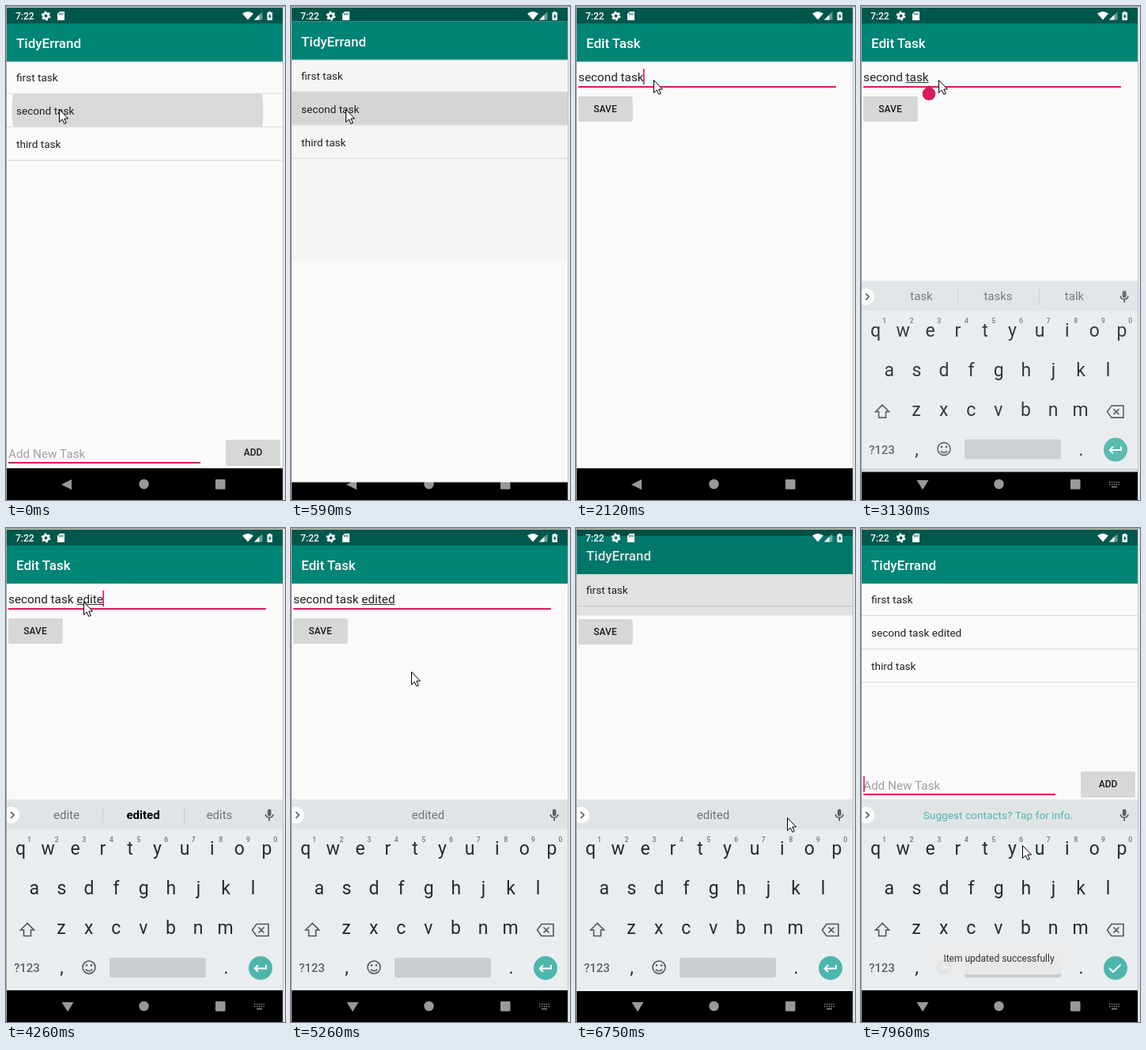
These frames come from a looping animation (353x623 px, 8 s). An HTML page:

```html
<!DOCTYPE html>
<html lang="en">
<head>
<meta charset="utf-8">
<title>Task list demo</title>
<style>
  html, body { margin: 0; width: 100%; height: 100%; overflow: hidden; background: #e6e6e6; }
  svg { display: block; width: 353px; height: 623px; font-family: Roboto, sans-serif; }
  text { white-space: pre; }
  .title { font-size: 17px; font-weight: 500; fill: #fff; }
  .row { font-size: 13.6px; fill: #212121; }
  .field { font-size: 15.3px; fill: #212121; }
  .btn { font-size: 12px; font-weight: 500; fill: #1c1c1c; text-anchor: middle; }
  .key { font-size: 23px; fill: #1f2d33; text-anchor: middle; }
  .hint { font-size: 9px; font-weight: 500; fill: #6f7a80; text-anchor: middle; }
  .sug { font-size: 15px; fill: #6b767c; text-anchor: middle; }
  .sug.strong { fill: #000; font-weight: 700; }
  .sug.tip { fill: #4db6ac; font-size: 13.7px; }
  .line { fill: none; stroke: #4b585e; stroke-width: 1.6; }
</style>
</head>
<body>
<svg viewBox="0 0 353 623">
  <defs>
    <clipPath id="rowClip"><rect x="1" y="111" width="349" height="41"/></clipPath>
    <clipPath id="editClip"><rect id="editBox" x="1" width="349" height="623"/></clipPath>
    <clipPath id="kbClip"><rect x="1" y="343" width="349" height="240"/></clipPath>
  </defs>

  <g id="list">
    <rect x="1" width="349" height="640" fill="#fafafa"/>
    <rect x="1" y="2" width="349" height="20" fill="#00574b"/>
    <rect x="1" y="22" width="349" height="48" fill="#008577"/>
    <rect x="1" y="70" width="349" height="1" fill="#000" opacity=".13"/>
    <text class="title" x="13" y="53">TidyErrand</text>
    <g clip-path="url(#rowClip)"><circle id="ripple" cx="166.5" cy="132" fill="#d9d9d9"/></g>
    <path d="M1 110.500H350M1 152.500H350M1 194.500H350" stroke="#dcdcdc"/>
    <text class="row" x="13" y="95">first task</text>
    <text class="row" x="13" y="137" id="second"></text>
    <text class="row" x="13" y="179">third task</text>
    <g id="adder">
      <text class="field" x="3" y="569.500" style="fill:#a0a0a0">Add New Task</text>
      <rect x="3" y="575" width="243" height="2" fill="#d81b60"/>
      <rect id="addCaret" x="3" y="553" width="1.600" height="20" fill="#d81b60"/>
      <rect x="278" y="548" width="69" height="32" rx="2" fill="#000" opacity=".15"/>
      <rect x="278" y="547" width="69" height="31.500" rx="2" fill="#d6d7d7"/>
      <text class="btn" x="312.500" y="567">ADD</text>
    </g>
    <rect id="dim" x="1" width="349" height="640" fill="#000"/>
  </g>

  <rect x="1" y="583" width="349" height="40" fill="#000"/>
  <g fill="#999">
    <path id="back" d="M70 603.500L83 597V610Z"/>
    <path id="down" d="M70.500 598H85.500L78 610Z"/>
    <circle cx="174.500" cy="603" r="6.200"/>
    <rect x="265" y="597" width="12.500" height="12.500" rx="1"/>
    <g id="kbIcon" fill="none" stroke="#888" stroke-width="1.500">
      <path d="M314 600.500H327M314 603.500H327" stroke-dasharray="1.500 1.400"/>
      <path d="M317 606.500H324"/>
    </g>
  </g>

  <g clip-path="url(#editClip)" id="editWrap">
    <rect id="editStatus" x="1" y="2" width="349" height="20" fill="#00574b"/>
    <g id="edit">
      <rect x="1" y="22" width="349" height="561" fill="#fafafa"/>
      <rect x="1" y="22" width="349" height="48" fill="#008577"/>
      <rect x="1" y="70" width="349" height="1" fill="#000" opacity=".13"/>
      <text class="title" x="13" y="53">Edit Task</text>
      <text class="field" x="3" y="95" id="entry"></text>
      <rect id="mark" y="96" height="1" fill="#333"/>
      <rect id="rule" x="3" y="101" width="326" height="2"/>
      <rect id="caret" y="79" width="1.600" height="20" fill="#d81b60"/>
      <path id="handle" d="M86 100L92 105A8.300 8.300 0 1 1 80 105Z" fill="#d81b60"/>
      <rect x="3" y="114.500" width="68.500" height="31.500" rx="2" fill="#000" opacity=".15"/>
      <rect id="save" x="3" y="114" width="68.500" height="31" rx="2"/>
      <text class="btn" x="37" y="133.700">SAVE</text>
    </g>
  </g>

  <g id="kb">
    <rect x="1" y="343" width="349" height="240" fill="#e9edf0"/>
    <rect x="1" y="343" width="349" height="37" fill="#e0e4e7"/>
    <rect x="1" y="342" width="349" height="1" fill="#000" opacity=".07"/>
    <circle cx="6.500" cy="362" r="10.500" fill="#fff" clip-path="url(#kbClip)"/>
    <path class="line" d="M6 358L10 362L6 366" stroke-width="2"/>
    <path id="bars" d="M122.500 352V372M225.500 352V372" stroke="#c6cbcf"/>
    <g id="sugs"></g>
    <rect x="330.800" y="354.500" width="4.800" height="9" rx="2.400" fill="#59656b"/>
    <path class="line" d="M328.300 361A4.900 4.900 0 0 0 338 361M333.200 366V369.500"/>
    <g id="keys"></g>
    <path class="line" d="M27 498.500L18.500 507H22.500V514.500H31.500V507H35.500Z"/>
    <path class="line" d="M317 499.500H332V514.500H317L311.500 507ZM319.500 503.500L326.500 510.500M326.500 503.500L319.500 510.500"/>
    <text x="10" y="560" font-size="15" font-weight="500" fill="#56636a">?123</text>
    <circle class="line" cx="105" cy="554" r="8"/>
    <path class="line" d="M100.800 556.500Q105 561 109.200 556.500"/>
    <circle cx="102" cy="551.500" r="1.300" fill="#4b585e"/>
    <circle cx="108" cy="551.500" r="1.300" fill="#4b585e"/>
    <rect x="131" y="542" width="122" height="25" rx="3" fill="#c9ced1"/>
    <circle cx="322" cy="555" r="15" fill="#4db6ac"/>
    <path id="enter" d="M329 551V555.500H315M319 551.200L314.700 555.500L319 559.800" fill="none" stroke="#fff" stroke-width="2"/>
    <path id="done" d="M314.500 555.500L319 560L328.500 550.500" fill="none" stroke="#fff" stroke-width="2"/>
  </g>

  <g id="toast">
    <rect x="84" y="523" width="181" height="40" rx="20" fill="#ebeced" opacity=".9"/>
    <text x="174.500" y="546.500" font-size="12" fill="#333" text-anchor="middle">Item updated successfully</text>
  </g>

  <g fill="#fff">
    <text x="12" y="17" font-size="12" font-weight="500">7:22</text>
    <circle cx="50.500" cy="12.500" r="3.200" fill="none" stroke="#fff" stroke-width="2.600"/>
    <circle cx="50.500" cy="12.500" r="5" fill="none" stroke="#fff" stroke-width="1.800" stroke-dasharray="2.620 2.616"/>
    <path d="M68 7H74V18H65V10Z"/>
    <path d="M67.500 9V11.500M69.700 8.500V11.500M71.900 8.500V11.500" stroke="#00574b"/>
    <path d="M299 9.500Q306 4.500 313 9.500L306 17.500Z"/>
    <path d="M324.500 7V17.500H314Z" opacity=".4"/>
    <path d="M320.500 11V17.500H314Z"/>
    <path d="M332.300 7H335V8H337V18H330.500V8H332.300Z"/>
    <path d="M334.300 9.500L331.800 13.500H333.400V16.500L335.900 12.300H334.300Z" fill="#00574b"/>
  </g>

  <path d="M0 .5H353" stroke="#8f8f8f"/>
  <path d="M1 1.500H350" stroke="#cfd8d6"/>
  <path d="M.5 0V623" stroke="#a3a3a3"/>
  <path d="M350.500 0V623" stroke="#c4c4c4"/>
  <path id="mouse" d="M.5 .5V16.500L4.200 13L6.800 18.500L9.300 17.400L6.800 12H11.500Z" fill="#fff" stroke="#000"/>
</svg>
<script>
const LOOP = 8000, HOLD = 140, PHASE = 20;
const FOCUS = 1820, TAP = 2540, TYPE = 3380, TYPE_END = 4500, KEY_GAP = 165;
const ADDED = " edited";
// Pointer waypoints: time, x, y.
const MOUSE = [[0, 67, 130], [1000, 70, 130], [1560, 98, 93], [4640, 98, 93], [5060, 190, 199],
  [5620, 38, 128], [5900, 38, 128], [6600, 267, 365], [6740, 267, 365], [7420, 204, 400]];

const $ = {};
document.querySelectorAll("[id]").forEach(e => $[e.id] = e);

const set = (e, attrs) => { for (const k in attrs) e.setAttribute(k, attrs[k]); };
const show = (e, on) => { e.style.display = on ? "" : "none"; };
const move = (e, x, y) => set(e, { transform: `translate(${x} ${y})` });
const clamp = (v, lo, hi) => Math.min(hi, Math.max(lo, v));
const ramp = (t, start, length) => clamp((t - start) / length, 0, 1);

function label(parent, cls, x, y, str) {
  const e = document.createElementNS("http://www.w3.org/2000/svg", "text");
  set(e, { class: cls, x, y });
  e.textContent = str;
  parent.append(e);
  return e;
}

[["qwertyuiop", 18.5], ["asdfghjkl", 35.8], ["zxcvbnm", 70]].forEach(([row, x], r) =>
  [...row].forEach((c, i) => {
    label($.keys, "key", x + 34.6 * i, 412 + 50 * r, c);
    if (!r) label($.keys, "hint", x + 11 + 34.6 * i, 395.5, (i + 1) % 10);
  }));
label($.keys, "key", 70.5, 562, ",");
label($.keys, "key", 278.5, 562, ".");
const sugs = [76.5, 173.5, 270].map(x => label($.sugs, "sug", x, 366.7, ""));

function pointer(t) {
  const i = MOUSE.findIndex(p => p[0] > t);
  if (i < 0) return MOUSE.at(-1).slice(1);
  const a = MOUSE[i - 1], b = MOUSE[i], k = ramp(t, a[0], b[0] - a[0]);
  return [1, 2].map(c => Math.round(a[c] + (b[c] - a[c]) * k));
}

function suggestions(typed, closed) {
  if (closed) return ["", "Suggest contacts? Tap for info.", ""];
  if (typed === ADDED.length) return ["", "edited", ""];
  if (typed > 1) return [ADDED.slice(1, typed), "edited", "edits"];
  return typed ? ["is", "and", "to"] : ["task", "tasks", "talk"];
}

function draw(t) {
  const open = ramp(t, 440, 700);
  const close = ramp(t, 6460, 560);
  const rise = ramp(t, 2680, 520);
  const saved = close > 0;
  const typed = t < TYPE ? 0 : Math.min(ADDED.length, 1 + Math.floor((t - TYPE) / KEY_GAP));

  // The caret restarts its blink on focus, on a tap and with each key.
  const since = t >= TYPE_END ? TYPE_END : typed ? t : t >= TAP ? TAP : FOCUS;
  const blink = t >= FOCUS && (t - since) % 1000 < 500;

  const listY = -12 * open * Math.min(1, 2 - 2 * close);
  move($.list, 0, listY);
  set($.dim, { opacity: -listY / 120 });
  set($.ripple, { r: t < HOLD ? 159 : 200 });
  show($.ripple, !saved);
  $.second.textContent = "second task" + (saved ? ADDED : "");
  move($.adder, 0, saved ? -240 : 0);
  show($.addCaret, saved && blink);

  show($.editWrap, open > 0 && close < 1);
  set($.editBox, { y: 623 * ((1 - open) ** 3 + close ** 2.5) });
  show($.editStatus, open === 1 && !saved);
  move($.edit, 0, 22 * (1 - open) + 2 * close);

  $.entry.textContent = "second task" + ADDED.slice(0, typed);
  const end = 3 + $.entry.getComputedTextLength();
  const start = typed > 1 ? 89.5 : 56.5;
  set($.mark, { x: start, width: end - start });
  show($.mark, t >= TAP && typed !== 1);
  set($.caret, { x: end - 0.6 });
  show($.caret, blink);
  show($.handle, t >= TAP && !typed);
  set($.rule, { fill: t < FOCUS ? "#bdbdbd" : "#d81b60" });
  set($.save, { fill: t >= 5900 && t < 5900 + HOLD ? "#c2c3c3" : "#d6d7d7" });

  show($.back, !rise);
  [$.kb, $.down, $.kbIcon].forEach(e => show(e, rise));
  move($.kb, 0, 24 * (1 - rise));
  set($.kb, { opacity: 1 - 2 * (1 - rise) ** 2 });
  const words = suggestions(typed, close === 1);
  sugs.forEach((e, i) => e.textContent = words[i]);
  show($.bars, words[0]);
  const style = close === 1 ? " tip" : typed > 1 && words[0] ? " strong" : "";
  set(sugs[1], { class: "sug" + style });
  show($.enter, close < 1);
  show($.done, close === 1);

  set($.toast, { opacity: ramp(t, 7020, 400) });
  move($.mouse, ...pointer(t));
  show($.mouse, t < 6180 || saved);
}

const began = performance.now();
let shown = -1;
function frame() {
  const now = Math.max(0, performance.now() - began) % LOOP;
  const t = Math.max(0, Math.floor((now - PHASE) / HOLD) * HOLD + PHASE);
  if (t !== shown) draw(shown = t);
  requestAnimationFrame(frame);
}
frame();
</script>
</body>
</html>
```
